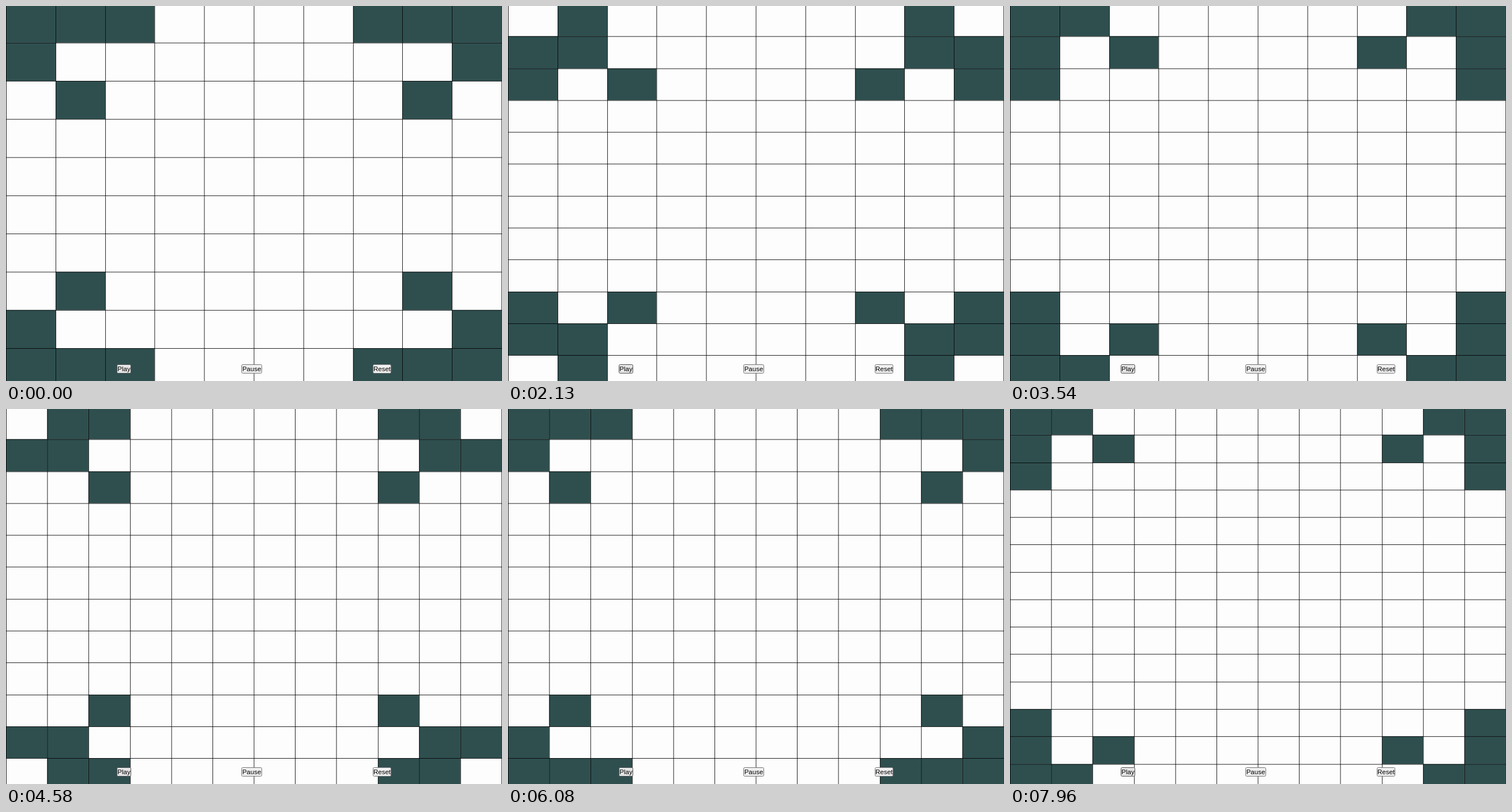
Animation of 860 by 651 pixels, one loop 8000 ms. Source, as an HTML page with a canvas:

```html
<!DOCTYPE html>
<html lang="en">
<head>
<meta charset="utf-8">
<title>Game of Life</title>
<style>
  html, body { margin: 0; width: 100%; height: 100%; overflow: hidden; background: #fdfdfd; }
  canvas { display: block; }
  span {
    position: absolute; top: 622px; height: 16px; box-sizing: border-box;
    border: 1px solid #767676; border-radius: 2.5px; background: #efefef; color: #000;
    font: 11.5px/14px "Liberation Sans", Arial, sans-serif;
    display: flex; justify-content: center; white-space: nowrap;
  }
  .play { left: 192px; width: 25px; background: #e5e5e5; border-color: #4f4f4f; }
  .pause { left: 408px; width: 36px; }
  .reset { left: 636px; width: 32px; }
</style>
</head>
<body>
<canvas width="860" height="651"></canvas>
<span class="play">Play</span>
<span class="pause">Pause</span>
<span class="reset">Reset</span>
<script>
const LOOP = 8000, FIRST_STEP = 2085, STEP = 1010, GENERATIONS = 7;
// The board is laid out on whole pixels of a larger page, then scaled down.
const SCALE = 0.861, PAGE_WIDTH = 998, PAGE_HEIGHT = 757;
const ctx = document.querySelector('canvas').getContext('2d');
ctx.scale(SCALE, SCALE);

// One glider per corner of a 10 x 10 board, each heading outwards.
function startCells() {
  const glider = [[0, 0], [0, 1], [0, 2], [1, 0], [2, 1]];
  return glider.flatMap(([r, c]) => [[r, c], [r, 9 - c], [9 - r, c], [9 - r, 9 - c]]);
}

function nextCells(cells) {
  const alive = new Set(cells.map(String));
  const neighbours = new Map();
  for (const [r, c] of cells)
    for (let dr = -1; dr <= 1; dr++)
      for (let dc = -1; dc <= 1; dc++)
        if (dr || dc) {
          const key = String([r + dr, c + dc]);
          neighbours.set(key, (neighbours.get(key) || 0) + 1);
        }
  return [...neighbours]
    .filter(([key, n]) => n === 3 || (n === 2 && alive.has(key)))
    .map(([key]) => key.split(',').map(Number));
}

// The board grows on both sides whenever a cell is born beyond its edge.
function buildGenerations() {
  const list = [];
  let cells = startCells(), padRows = 0, padCols = 0;
  for (let i = 0; i < GENERATIONS; i++) {
    padRows = Math.max(padRows, ...cells.map(([r]) => -r));
    padCols = Math.max(padCols, ...cells.map(([, c]) => -c));
    list.push({ cells, padRows, padCols });
    cells = nextCells(cells);
  }
  return list;
}

function draw({ cells, padRows, padCols }) {
  const rows = 10 + 2 * padRows, cols = 10 + 2 * padCols;
  const x = i => Math.round(PAGE_WIDTH * i / cols);
  const y = i => Math.round((758.6 / rows + 1.09) * i - 3.04);

  ctx.fillStyle = '#fdfdfd';
  ctx.fillRect(0, 0, PAGE_WIDTH + 2, PAGE_HEIGHT);
  ctx.fillStyle = '#2f4f4f';
  for (const [r, c] of cells) {
    const row = r + padRows, col = c + padCols;
    ctx.fillRect(x(col), y(row), x(col + 1) - x(col), y(row + 1) - y(row));
  }
  ctx.fillStyle = '#000';
  for (let i = 0; i <= cols; i++) ctx.fillRect(x(i), 0, 1, PAGE_HEIGHT);
  for (let i = 0; i <= rows; i++) ctx.fillRect(0, y(i), PAGE_WIDTH + 1, 1);
}

const generations = buildGenerations();
const start = performance.now();

function frame() {
  const time = (performance.now() - start) % LOOP;
  const index = Math.floor((time - FIRST_STEP) / STEP) + 1;
  draw(generations[Math.min(GENERATIONS - 1, Math.max(0, index))]);
  requestAnimationFrame(frame);
}
frame();
</script>
</body>
</html>
```
